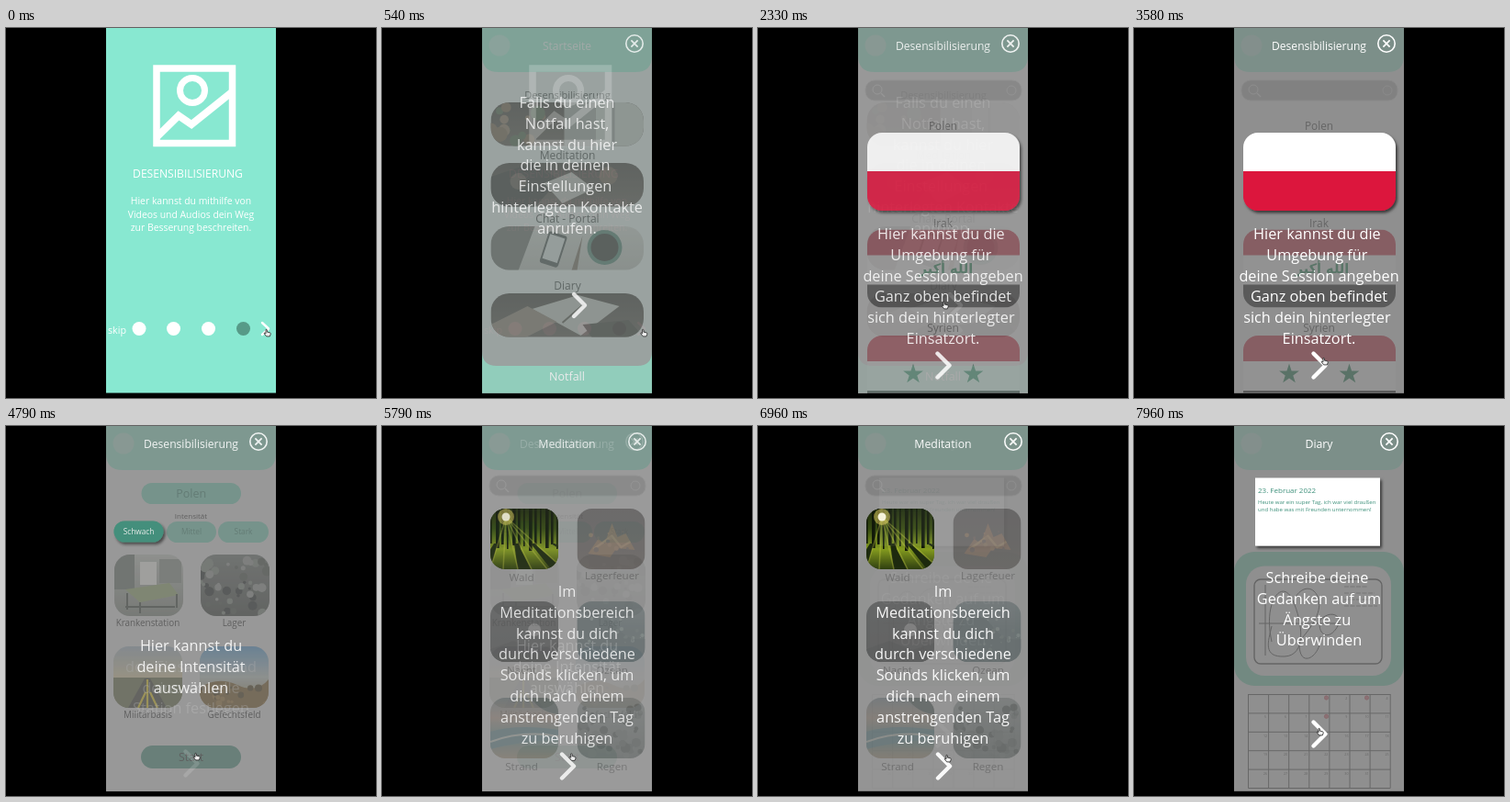
Recreate the animation shown at these times as an HTML page. Size 403 by 403 pixels, loop 8 s.

```html
<!DOCTYPE html>
<html lang="de">
<head>
<meta charset="utf-8">
<style>
html, body { margin: 0; width: 100%; height: 100%; overflow: hidden; background: #000; }
svg { display: block; width: 100vw; height: 100vh; }
text { font-family: "Open Sans", "Noto Sans", sans-serif; text-anchor: middle; white-space: pre; }
</style>
</head>
<body>
<svg viewBox="0 0 403 403">
  <defs>
    <clipPath id="phone"><rect x="109" y="0" width="185" height="397.5"/></clipPath>
    <filter id="shadow" x="-20%" y="-20%" width="150%" height="160%">
      <feDropShadow dx="2" dy="2.5" stdDeviation="1.6" flood-opacity=".6"/>
    </filter>
  </defs>
  <g clip-path="url(#phone)">
    <g id="unders"></g>
    <g id="veils"></g>
    <g id="fronts"></g>
  </g>
  <path id="cursor" d="M0 -3.5q1-.6 1.4.4v2.2l3 .7q1.2.4.8 1.7l-.9 2.4h-3.6l-2.4-3q-.4-1 .7-.9l1 .7z"
        fill="#eee" stroke="#222" stroke-width=".8"/>
</svg>
<script>
const CX = 201.5, INK = '#2c2c2c';
let ids = 0;

const rect = (x, y, w, h, fill, r = 0, more = '') =>
  `<rect x="${x}" y="${y}" width="${w}" height="${h}" rx="${r}" fill="${fill}" ${more}/>`;
const disc = (x, y, r, fill, more = '') => `<circle cx="${x}" cy="${y}" r="${r}" fill="${fill}" ${more}/>`;
const line = (d, color, width, more = '') =>
  `<path d="${d}" fill="none" stroke="${color}" stroke-width="${width}" ${more}/>`;
const shape = (d, fill) => `<path d="${d}" fill="${fill}"/>`;
const text = (s, x, y, size, fill = '#fff', more = '') =>
  `<text x="${x}" y="${y}" font-size="${size}" fill="${fill}" ${more}>${s}</text>`;
const lifted = s => `<g filter="url(#shadow)">${s}</g>`;
const hint = (y, rows) => rows.map((s, i) => text(s, CX, y + i * 22.8, 16.25)).join('');
const chevron = (x, y, w = 13, h = 13, width = 4.4) =>
  line(`M${x} ${y - h}l${w} ${h}l${-w} ${h}`, '#fff', width, 'stroke-linecap="round" stroke-linejoin="round"');
const close = x => disc(x, 17, 9.2, 'none', 'stroke="#fff" stroke-width="1.6"') +
  line(`M${x - 3.6} 13.4l7.2 7.2m0 -7.2l-7.2 7.2`, '#fff', 1.7);
const title = (s, x, size = 12.3) => text(s, CX, 24, size) + close(x);
const base = () => rect(109, 0, 185, 398, '#e8e8e8') +
  shape('M109 0H294V30Q294 48 276 48H127Q109 48 109 30Z', '#93e8cd') + disc(128, 19, 11.5, '#b4e8d8');
const search = y => rect(117, y, 170, 22, '#a9a9a9', 10, 'stroke="#c8c8c8"') +
  disc(130, y + 10, 5, 'none', 'stroke="#e0e0e0"') + line(`M134 ${y + 14}l4 4`, '#e0e0e0', 1.2) +
  disc(276, y + 11, 5, 'none', 'stroke="#d0d0d0"');

// Rounded picture box; the content uses its own local coordinates.
function card(x, y, w, h, r, inner) {
  const id = 'c' + ids++;
  return `<g transform="translate(${x} ${y})">
    <clipPath id="${id}">${rect(0, 0, w, h, '#000', r)}</clipPath>
    <g clip-path="url(#${id})">${inner}</g></g>`;
}
function fade(w, h, stops) {
  const id = 'g' + ids++;
  const list = stops.map((c, i) => `<stop offset="${i / (stops.length - 1)}" stop-color="${c}"/>`).join('');
  return `<linearGradient id="${id}" x2="0" y2="1">${list}</linearGradient>` + rect(0, 0, w, h, `url(#${id})`);
}
function random(seed) {
  return () => (seed = (seed * 16807) % 2147483647) / 2147483647;
}
function specks(n, seed, x, y, w, h, r, colors) {
  const rnd = random(seed);
  return Array.from({ length: n }, (_, i) =>
    disc((x + rnd() * w).toFixed(1), (y + rnd() * h).toFixed(1), (r * (0.4 + rnd())).toFixed(1), colors[i % colors.length])).join('');
}
function star(cx, cy, r, fill) {
  const pts = Array.from({ length: 10 }, (_, i) => {
    const a = i * Math.PI / 5, q = i % 2 ? r * 0.39 : r;
    return (cx + q * Math.sin(a)).toFixed(1) + ',' + (cy - q * Math.cos(a)).toFixed(1);
  });
  return `<polygon points="${pts.join(' ')}" fill="${fill}"/>`;
}

// Every page has a part under the grey veil and a part in front of it.
function intro() {
  const rows = ['Hier kannst du mithilfe von', 'Videos und Audios dein Weg', 'zur Besserung beschreiten.'];
  return {
    under: rect(109, 0, 185, 398, '#88e8d1') +
      text('DESENSIBILISIERUNG', 198, 162.5, 12.1) +
      rows.map((s, i) => text(s, 201.5, 192 + i * 14.5, 10.4)).join('') +
      text('skip', 121, 332.5, 10.7) +
      [145, 182.5, 220.5].map(x => disc(x, 327.5, 7.5, '#fff')).join('') +
      disc(258.5, 327.5, 7.5, '#579a88') + chevron(279, 327.5, 7, 6.5, 2.4),
    front: rect(164, 44, 82.5, 81.5, 'none', 0, 'stroke="#fff" stroke-width="7.5"') +
      disc(203, 68, 13.5, 'none', 'stroke="#fff" stroke-width="7"') +
      line('M164 119L188 95.5L202 105L247 69', '#fff', 8)
  };
}

function emergency() {
  const desk = fade(167, 48, ['#2a1d1a', '#4a3a34']);
  const pics = [
    desk + specks(14, 5, 0, 2, 62, 42, 6, ['#6a4a34', '#3d4a30', '#80604a']) +
      rect(80, 0, 34, 48, '#96918d') + rect(114, 0, 53, 48, '#c4c2be') + rect(132, 0, 3, 48, '#8a8a8a'),
    desk + shape('M0 15L45 0L75 18L48 48H0Z', '#1c1512') + shape('M58 22L88 10L112 28L78 44Z', '#b8b0aa') +
      disc(128, 14, 10, '#5a4034') + disc(30, 20, 9, '#4a3830'),
    fade(167, 48, ['#cfcac6', '#b4aeaa']) + shape('M0 0H48L30 48H0Z', '#5a5551') +
      `<g transform="rotate(18 68 24)">${rect(58, 7, 21, 36, '#333', 3) + rect(60, 10, 17, 28, '#d8d8d8')}</g>` +
      disc(124, 23, 19, '#3c6a5c') + disc(124, 23, 15, '#1c1614') + shape('M88 48L100 10L94 48Z', '#6a5548'),
    desk + shape('M45 17L95 2L140 14L98 46Z', '#c4beb8') + shape('M0 34L40 14L72 31L38 48H0Z', '#80685c') +
      line('M78 32L101 12', '#423630', 2) + shape('M100 34L150 29L167 48H110Z', '#2a1f1b')
  ];
  const names = ['Desensibilisierung', 'Meditation', 'Chat - Portal', 'Diary'];
  const tops = [81, 147, 216, 289];
  const rows = ['Falls du einen', 'Notfall hast,', 'kannst du hier', 'die in deinen ', 'Einstellungen ', 'hinterlegten Kontakte', 'anrufen.'];
  return {
    under: base() + text('Startseite', CX, 23.5, 12) +
      tops.map((y, i) => text(names[i], 202, y - 4, i ? 12 : 11, INK) +
        card(118.5, y, 166.5, 47.5, 20, pics[i])).join(''),
    front: shape('M109 352Q109 368 125 368H278Q294 368 294 352V398H109Z', '#8fd9c3') +
      text('Notfall', CX, 384, 12.5) + close(275) + hint(87, rows) + chevron(209, 302, 12, 12)
  };
}

function places() {
  const flag = (y, mid) => card(119, y, 166, 85, 16,
    rect(0, 0, 166, 85, '#f4f4f4') + rect(0, 0, 166, 28, '#c01028') + rect(0, 60, 166, 25, '#000') + mid);
  const rows = ['Hier kannst du die ', 'Umgebung für ', 'deine Session angeben', 'Ganz oben befindet', 'sich dein hinterlegter ', 'Einsatzort.'];
  const script = text('الله أكبر', 86, 47, 14.5, '#00743c', 'style="font-family:\'DejaVu Sans\',sans-serif" font-weight="bold"');
  return {
    under: base() + search(57) + text('Polen', CX, 111, 11.8, INK) +
      text('Irak', CX, 217, 12, INK) + flag(219.5, script) +
      text('Syrien', CX, 331, 12, INK) + flag(335, star(50, 42, 11.5, '#00693a') + star(115.5, 42, 11.5, '#00693a')),
    front: lifted(card(119, 114, 166, 85, 16, rect(0, 0, 166, 43, '#fff') + rect(0, 42, 166, 43, '#dc143c'))) +
      title('Desensibilisierung', 275, 12.1) + hint(230, rows) + chevron(195.5, 367.5)
  };
}

function session(choosePlace) {
  const pics = [
    fade(75, 67, ['#b4b8b2', '#7c827a']) + rect(0, 0, 22, 38, '#6c756e') + rect(28, 8, 18, 25, '#dcded8') +
      rect(49, 5, 24, 26, '#858c84') + shape('M12 38L60 31L70 44L28 52Z', '#8fa070') +
      line('M14 42V60M28 52V64M68 43V58M12 57H66', '#4a504a', 2),
    fade(75, 67, ['#6c726e', '#484c48']) + specks(46, 17, 0, 6, 75, 58, 4, ['#343836', '#7a807a', '#525852', '#8c908c']),
    fade(75, 67, ['#9aa8b4', '#c8bc98', '#5c6048']) + shape('M0 34H75V67H0Z', '#6c7054') + shape('M34 35H40L58 67H16Z', '#4c4e46') +
      line('M37 36V67M35 50L27 67M40 50L48 67', '#d0b830', 2.2),
    fade(75, 67, ['#5c94c0', '#b0b8b4', '#8a7440']) + shape('M0 45Q20 32 41 42T75 36V67H0Z', '#7a6038') +
      specks(16, 31, 2, 44, 70, 20, 3, ['#54482c', '#947444'])
  ];
  const spots = [[118, 140], [212, 140], [117, 240], [211, 240]];
  const names = ['Krankenstation', 'Lager', 'Militärbasis', 'Gefechtsfeld'];
  const photos = spots.map(([x, y], i) => card(x, y, 75, 67, 17, pics[i])).join('');
  const pill = (x, y, w, h, s, size, fill = '#78d6bc', ink = '#3a8a74') =>
    rect(x, y, w, h, fill, h / 2) + text(s, x + w / 2, y + h / 2 + size * 0.36, size, ink);
  const weak = (fill, ink) => pill(117.5, 103.5, 54, 23, 'Schwach', 8.3, fill, ink);
  return {
    under: base() + pill(147.5, 62, 108.5, 23, 'Polen', 12.5) + text('Intensität', CX, 101, 8, INK) + weak() +
      pill(175, 104, 54, 23, 'Mittel', 8.3) + pill(231, 104, 55, 23, 'Stark', 8.3) + photos +
      names.map((s, i) => text(s, i % 2 ? 248.5 : 154.5, spots[i][1] + 77.5, 9.9, INK)).join('') +
      pill(147, 348, 109, 25, 'Start', 12.2, '#4c9683', INK),
    front: title('Desensibilisierung', 275, 12.1) + (choosePlace
      ? photos + hint(245, ['Hier kannst du', 'den Einsatzort und', 'deine aktuelle', 'Station festlegen']) + chevron(195.5, 367.5)
      : lifted(weak('#3c8f79', '#fff')) + hint(245, ['Hier kannst du', 'deine Intensität', 'auswählen']))
  };
}

function meditation() {
  const trunks = Array.from({ length: 13 }, (_, i) => rect(i * 6, 0, 1.6 + i * 2 % 3, 38 + i * 5 % 9, '#0d1505')).join('');
  const shade = [4, 26, 44, 66].map(x => shape(`M${x} 38L${x * 2 - 22} 66H${x * 2 - 8}L${x + 4} 38Z`, '#1a270a')).join('');
  const rays = [0, 14, 30, 45, 62, 80].map(x => line(`M17 9L${x} 66`, '#d4d848', 1.5, 'opacity=".35"')).join('');
  const forest = fade(74, 66, ['#1a270a', '#33480d', '#879f1c', '#2c3d0c']) + trunks + shade + rays +
    disc(17, 9, 9, '#f5df62', 'opacity=".5"') + disc(17, 9, 4.5, '#fffce0');
  const pics = [
    fade(74, 66, ['#1c2a0a', '#182407']),
    fade(74, 66, ['#343030', '#4a3c34']) + shape('M12 49L23 33L30 38L38 16L44 31L53 27L63 45L43 43L36 53Z', '#8a5a30') +
      line('M18 44L38 30L48 42L58 36', '#b88448', 2.5) + specks(10, 9, 15, 24, 45, 26, 2, ['#a06c3c', '#5c4437']),
    fade(74, 66, ['#2c3030', '#202222']) + disc(48, 31, 7, '#9a9c9a') + shape('M0 52L25 43L50 53L74 45V66H0Z', '#141616'),
    fade(74, 66, ['#6c8488', '#486468', '#587070']) + shape('M0 20Q30 8 42 26T74 41V66H0Z', '#3c585c') +
      specks(35, 23, 8, 15, 65, 46, 1.6, ['#84a09c', '#587472']),
    fade(74, 66, ['#70848c', '#b09480', '#4c8484', '#a48c6c']) + shape('M0 37Q30 28 74 35V45Q30 48 0 56Z', '#4c8088') +
      line('M0 48Q35 35 74 42', '#c8d0c4', 2) + shape('M44 0H74V18Q55 16 44 0Z', '#3c504c'),
    fade(74, 66, ['#8c9694', '#5c6864']) + specks(50, 41, 6, 10, 64, 54, 4, ['#3c4844', '#505c58', '#64706c'])
  ];
  const names = ['Wald', 'Lagerfeuer', 'Nacht', 'Ozean', 'Strand', 'Regen'];
  const tops = [90, 191, 296];
  const rows = ['Im', 'Meditationsbereich', 'kannst du dich', 'durch verschiedene', 'Sounds klicken, um', 'dich nach einem', 'anstrengenden Tag', 'zu beruhigen'];
  return {
    under: base() + search(54) + pics.map((p, i) => {
      const y = tops[i >> 1];
      return card(i % 2 ? 212.5 : 118, y, 74, 66, 16, p) +
        text(names[i], i % 2 ? 250.5 : 152, y + (i === 1 ? 77 : 79), 11.6, '#5c5c5c');
    }).join(''),
    front: card(118, 90, 74, 66, 16, forest) + title('Meditation', 278) + hint(186, rows) + chevron(196, 370.5)
  };
}

function diary() {
  const green = '#3f917c';
  let grid = '', days = '';
  for (let i = 0; i <= 7; i++) grid += `M${124.5 + i * 22.1} 292V394.5`;
  for (let i = 0; i <= 5; i++) grid += `M124.5 ${292.5 + i * 20.4}H279.2`;
  for (let i = 0; i < 31; i++) {
    const n = i + 3;
    days += text(i + 1, 143 + n % 7 * 22.1, 298 + (n / 7 | 0) * 20.4, 3.6, INK);
  }
  const left = (s, y, size) => text(s, 135, y, size, green, 'style="text-anchor:start"');
  const notes = [0, 1, 2, 3].map(i => line(`M229 ${175 + i * 7}h${26 + i * 7 % 11}`, '#777', 1, 'stroke-dasharray="5 1.5"')).join('');
  return {
    under: base() + rect(109, 137, 185, 146, '#68caa8', 22) + rect(122, 152.5, 158, 119.5, '#e4e4e4', 20) +
      rect(131, 167, 139, 92, 'none', 7, `stroke="${INK}" stroke-width="1.4"`) +
      line('M143 173V250M136 215H220M150 235C140 190 162 165 173 190S188 250 164 251S146 235 150 218M176 186C190 165 210 185 198 209S177 230 181 246S204 249 203 229M203 211C215 199 230 207 220 221S199 225 203 211', INK, 1) +
      notes + line(grid, '#383838', 1) + days +
      [[209.5, 296], [253.5, 296], [209.5, 316.3]].map(([x, y]) => disc(x, y, 2.2, '#d06070', 'stroke="#c02030" stroke-width=".6"')).join(''),
    front: lifted(rect(132, 56.5, 136, 74, '#fff')) +
      left('23. Februar 2022', 73, 8) +
      left('Heute war ein super Tag, ich war viel draußen', 84.5, 6.07) +
      left('und habe was mit Freunden unternommen!', 92.5, 6.07) + title('Diary', 278) +
      hint(171, ['Schreibe deine ', 'Gedanken auf um', 'Ängste zu ', 'Überwinden']) + chevron(195.5, 335.5)
  };
}

const pages = [intro(), emergency(), places(), session(true), session(false), meditation(), diary()];
function fill(id, parts) {
  const node = document.getElementById(id);
  node.innerHTML = parts.map(p => `<g>${p}</g>`).join('');
  return [...node.children];
}
const unders = fill('unders', pages.map(p => p.under));
const veils = fill('veils', pages.map((p, i) => i ? rect(109, 0, 185, 398, '#767676') : ''));
const fronts = fill('fronts', pages.map(p => p.front));
const cursor = document.getElementById('cursor');

const LOOP = 8000, FADE = 400, VEIL = 0.77;
const starts = [-FADE, 325, 2085, 4130, 4545, 5570, 6950];
// time, x, y
const path = [
  [0, 283, 332], [950, 284, 332], [1600, 202, 302], [2540, 202, 302], [3250, 206, 363],
  [4300, 206, 363], [4600, 206, 360], [5600, 206, 360], [6200, 205, 362], [7150, 205, 362], [7700, 201, 333], [8000, 201, 333]
];
const clamp = v => Math.max(0, Math.min(1, v));
function show(node, alpha) {
  node.style.display = alpha > 0 ? '' : 'none';
  node.style.opacity = alpha;
}

function draw(t) {
  const mix = starts.map(s => 1 - (1 - clamp((t - s) / FADE)) ** 2);
  mix.forEach((m, i) => {
    const next = mix[i + 1] || 0, seen = m * (1 - next);
    show(unders[i], next < 1 ? m : 0);
    show(veils[i], VEIL * seen);
    show(fronts[i], seen);
  });
  const i = path.findIndex(p => p[0] > t), a = path[i - 1], b = path[i];
  const p = (t - a[0]) / (b[0] - a[0]), e = p * p * (3 - 2 * p);
  cursor.setAttribute('transform', `translate(${a[1] + (b[1] - a[1]) * e} ${a[2] + (b[2] - a[2]) * e})`);
}

const begin = performance.now();
function tick() {
  draw((performance.now() - begin) % LOOP);
  requestAnimationFrame(tick);
}
tick();
</script>
</body>
</html>
```
